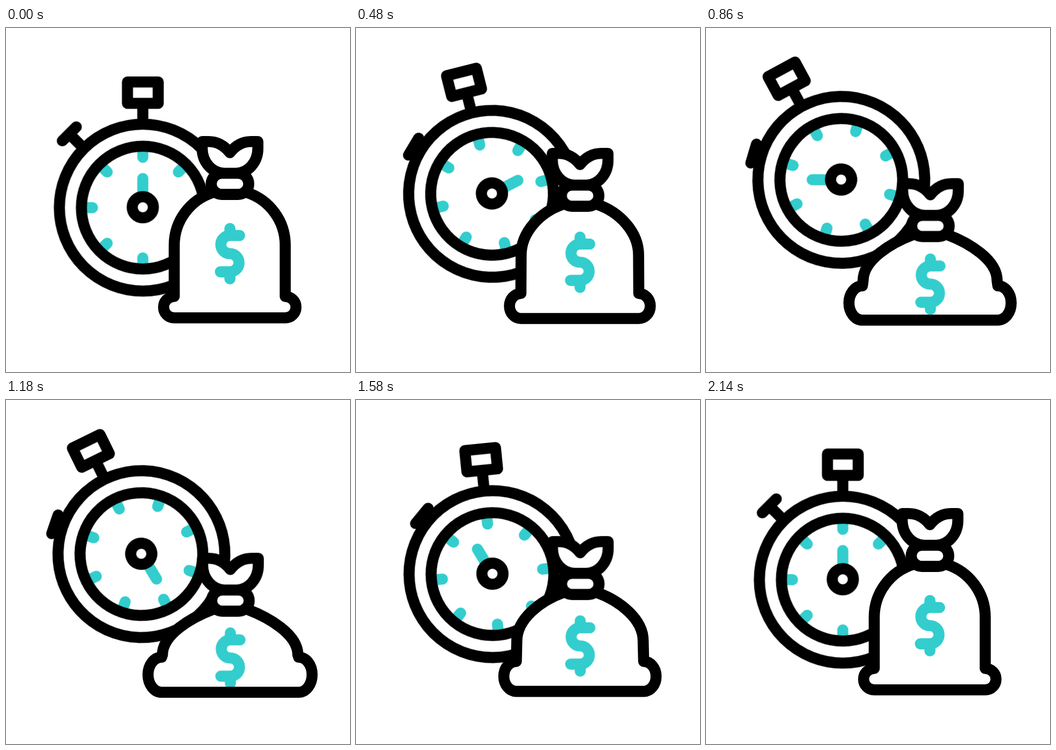
An HTML page for the animation above (2400 ms loop, 640x640 px).

```html
<!DOCTYPE html>
<html lang="en">
<head>
<meta charset="utf-8">
<title>Time is money</title>
<style>
  html, body { margin: 0; width: 100%; height: 100%; overflow: hidden; background: #fff; }
  svg { display: block; width: 100vw; height: 100vh; }

  .line { fill: none; stroke: #000; stroke-width: 20.6; stroke-linecap: round; stroke-linejoin: round; }
  .solid { fill: #fff; }
  .teal { stroke: #33cdcd; }
  .bare { stroke: none; }

  .watch, .pusher, .hand, .top, .dollar, .sack {
    animation: 2400ms infinite both;
  }
  .watch { animation-name: tilt; }
  .pusher { animation-name: press; }
  .hand { animation-name: spin; }
  .top { animation-name: sink; --drop: 83.3px; }
  .dollar { animation-name: sink; --drop: 60.2px; }
  .sack { animation-name: squash; }

  /* cubic-bezier(1/3, 0, 2/3, 1) is a plain smoothstep */
  .watch, .pusher { animation-timing-function: cubic-bezier(.3333, 0, .6667, 1); }
  .hand, .top, .dollar, .sack { animation-timing-function: cubic-bezier(.5, 0, .5, 1); }

  @keyframes tilt {
    0%, 75.2%, 100% { transform: translate(0, 0) rotate(0deg); }
    41.67% { transform: translate(-2.9px, -54.5px) rotate(-30deg); }
  }
  @keyframes press {
    0%, 89.17%, 100% { transform: translate(0, 0); }
    20.83%, 65.83% { transform: translate(16.6px, 16.6px); }
  }
  @keyframes spin {
    0%, .83% { transform: rotate(0deg); }
    77.5%, 100% { transform: rotate(720deg); }
  }
  @keyframes sink {
    0%, 6.4%, 82.7%, 100% { transform: translate(0, 0); }
    42.9%, 52.9% { transform: translate(.8px, var(--drop)); }
  }
  @keyframes squash {
    0%, 6.4%, 82.7%, 100% {
      d: path("M313 499.5 L313 404 C313 359.4 342.3 319.7 385 306 L448 306 C490.5 319.7 519.5 359.4 519.5 404 L519.5 499.5 C530.7 499.5 539.5 508.4 539.5 519.4 C539.5 530.4 530.7 539.3 519.5 539.3 L313 539.3 C302 539.3 293.2 530.4 293.2 519.4 C293.2 508.4 302 499.5 313 499.5 Z");
    }
    42.9%, 52.9% {
      d: path("M289.5 478.5 L291 474 C291 436 344 405 385.5 389.3 L448.7 389.3 C490 405 543 436 543 474 L544.5 478.5 C558.5 478.5 569.5 493 569.5 511 C569.5 529 558.5 543.8 544.5 543.8 L289.5 543.8 C275.5 543.8 264.2 529 264.2 511 C264.2 493 275.5 478.5 289.5 478.5 Z");
    }
  }
</style>
</head>
<body>
<svg viewBox="0 0 640 640">
  <defs>
    <path id="tick" d="M0 -108 V-93.6"/>
  </defs>

  <g transform="translate(254.5 334.2)">
    <g class="watch line">
      <path class="pusher" d="M-149.7 -124.2 L-123.7 -150.2 M-136.7 -137.2 L-110 -110.5"/>
      <path d="M0 -194 V-155"/>
      <rect class="solid" x="-28.5" y="-233.8" width="57.2" height="39.8"/>
      <circle class="solid" r="155.2"/>
      <g class="teal">
        <use href="#tick"/>
        <use href="#tick" transform="rotate(45)"/>
        <use href="#tick" transform="rotate(90)"/>
        <use href="#tick" transform="rotate(135)"/>
        <use href="#tick" transform="rotate(180)"/>
        <use href="#tick" transform="rotate(225)"/>
        <use href="#tick" transform="rotate(270)"/>
        <use href="#tick" transform="rotate(315)"/>
      </g>
      <circle r="114.2"/>
      <path class="hand teal" d="M0 -20 V-54.3"/>
      <circle class="solid" cy="-.7" r="19.7"/>
    </g>
  </g>

  <g class="line">
    <path class="sack solid bare"/>
    <path class="dollar teal" d="M434.6 386 H416.6 A16.9 16.9 0 0 0 416.6 419.8 A16.9 16.9 0 0 1 416.6 453.6 H398.8 M416.6 373 V386 M416.6 453.6 V466.7"/>
    <path class="sack"/>
    <g class="top solid">
      <path d="M365 211.3 H377 C395 211.3 407 220 416.6 232 C426 220 438 211.3 456 211.3 H468.6 V224 C468.6 250 450 270.2 428 270.2 H406 C384 270.2 365 250 365 224 Z"/>
      <rect x="381.8" y="270.2" width="69.8" height="39.4" rx="19.7"/>
    </g>
  </g>
</svg>
</body>
</html>
```
